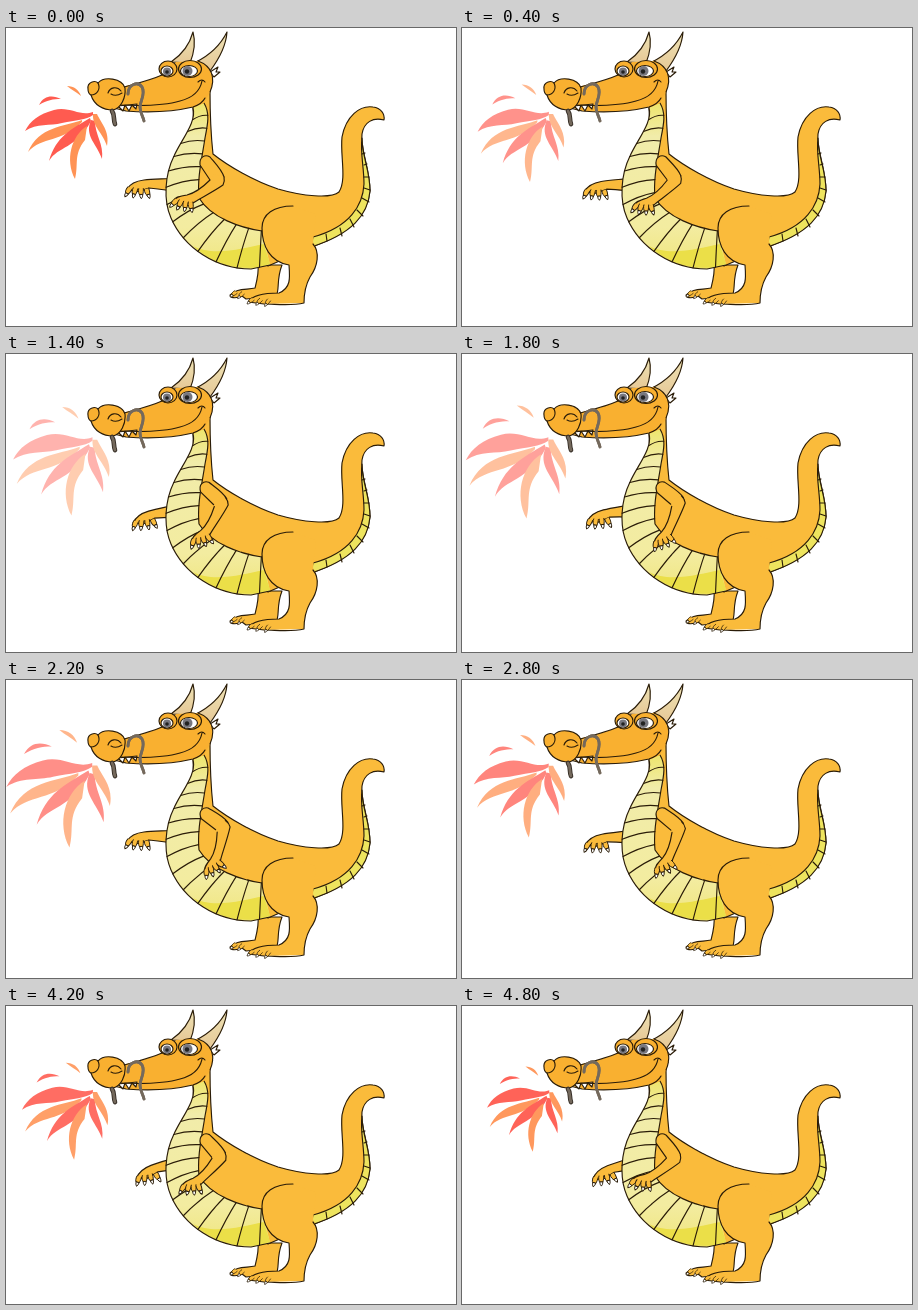
Recreate the animation shown at these times as an HTML page. Size 450 px wide and 298 px high, loop 5 s.

```html
<!DOCTYPE html>
<html lang="en">
<head>
<meta charset="utf-8">
<title>Dragon breathing fire</title>
<style>
html, body { margin: 0; width: 100%; height: 100%; overflow: hidden; background: #fff; }
svg { display: block; width: 450px; height: 298px; }
.ink { stroke: #2a1c08; stroke-width: 1.15; stroke-linejoin: round; stroke-linecap: round; }
.line { fill: none; }
.skin { fill: #fabb3b; }
.head { fill: #f9b030; }
.bare { stroke: none; }
.whisker { fill: none; stroke-linecap: round; stroke: #332b24; stroke-width: 4.6; }
.whisker + .whisker { stroke: #74695c; stroke-width: 2.8; }
.red { fill: #ff5b50; }
.orange { fill: #ff9355; }
</style>
</head>
<body>
<svg viewBox="0 0 450 298">
  <defs>
    <linearGradient id="belly" x1="0" y1="0" x2="0" y2="1">
      <stop offset="0" stop-color="#eee56c"/>
      <stop offset=".2" stop-color="#f1ecaa"/>
      <stop offset=".75" stop-color="#f3eca0"/>
      <stop offset="1" stop-color="#efe57c"/>
    </linearGradient>
    <linearGradient id="horn" x1="0" y1="0" x2="0" y2="1">
      <stop offset="0" stop-color="#ede2b5"/>
      <stop offset="1" stop-color="#e6c896"/>
    </linearGradient>
    <g id="toe">
      <path class="skin" d="M-3 0C-4 3 -3 7 -2 8L2 8C3 5 3 2 3 0"/>
      <path fill="#fff" d="M-2 8Q-2 11 0 13Q2 11 2 8Z"/>
    </g>
  </defs>

  <g id="fire">
    <path class="orange" d="M61 58C68 58 73 62 75 68C70 64 66 62 61 58Z"/>
    <path class="red" d="M33 77C38 67 47 67 55 71C47 71 41 72 33 77Z"/>
    <path class="red" d="M87 84C74 89 64 78 48 82C33 86 24 93 19 103C31 95 44 98 56 95C70 92 80 92 87 87Z"/>
    <path class="orange" d="M76 92C58 99 33 98 22 124C36 108 56 115 76 94Z"/>
    <path class="red" d="M84 90C66 101 50 108 43 133C52 118 70 121 85 93Z"/>
    <path class="orange" d="M81 98C65 108 59 132 69 151C73 136 67 127 79 112Z"/>
    <path class="red" d="M85 92C78 108 91 116 96 131C98 116 89 107 89 93Z"/>
    <path class="orange" d="M87 86C86 98 97 105 101 118C104 103 95 95 91 86Z"/>
  </g>

  <!-- far arm and leg -->
  <g id="farArm" class="ink">
    <path class="skin" d="M172 150C157 151 147 151 138 152C130 153 124 156 121 161L130 164L143 160C155 161 166 163 172 165Z"/>
    <g id="farHand"></g>
  </g>
  <path class="ink skin" d="M252 237C253 245 251 252 249 260C241 262 230 260 224 267C225 271 232 270 236 268L240 271L270 268C274 262 270 252 276 237Z"/>
  <g id="farFoot" class="ink"></g>

  <!-- trunk and tail -->
  <path class="ink skin" d="M187 78L204 62C204 85 205 108 207 126C222 138 248 153 272 161C296 168 325 171 333 164C341 151 334 128 336 109C340 88 354 77 367 79C375 80 379 86 378 92C367 89 358 94 356 106C354 121 364 140 364 163C362 186 345 205 306 219L262 238L190 180Z"/>
  <path class="ink" fill="#eee45e" d="M356 110C354 124 358 139 358 156C357 177 344 199 307 209L305 219C346 206 362 187 364 163C364 142 356 129 356 110Z"/>
  <path class="ink line" d="M356 126L359 125M358 137L361 136M358 149L363 149M358 160L364 162M356 170L363 174M351 182L357 188M344 191L348 199M334 200L336 208M320 206L321 213"/>
  <path class="bare" fill="url(#belly)" d="M187 80C191 94 175 112 168 128C159 146 157 172 165 190C178 220 210 241 245 241L264 237L256 203C235 200 205 190 193 170C191 150 196 130 199 110C202 95 204 85 198 75Z"/>
  <path class="bare" fill="#ebdf48" d="M187 218C207 229 238 220 258 216L264 236C240 245 208 238 187 218Z"/>
  <path id="front" class="ink line" d="M187 80C191 94 175 112 168 128C159 146 157 172 165 190C178 220 210 241 245 241L264 237"/>
  <path id="inner" class="ink line" d="M198 75C204 85 202 95 199 110C196 130 191 150 193 170C205 190 235 200 256 203"/>
  <path id="stripes" class="ink line"/>

  <!-- near leg -->
  <path class="skin" d="M256 200C256 186 268 178 287 178L310 186L307 214C314 224 312 238 304 249C299 258 298 267 298 275L258 276L242 274C247 266 263 265 273 265C285 260 284 250 283 237C264 234 256 218 256 200Z"/>
  <path class="ink line" d="M287 178C268 178 256 186 256 200C256 218 264 234 283 237C284 250 285 260 273 265C263 265 247 266 242 274L258 276C270 276 285 278 298 275C298 267 299 258 304 249C312 238 314 224 307 216"/>
  <g id="nearFoot" class="ink"></g>

  <!-- horns, ear, head -->
  <g class="ink" fill="url(#horn)">
    <path d="M165 34C177 26 184 15 187 4C190 15 188 25 184 35Z"/>
    <path d="M190 34C204 27 215 16 221 4C220 19 213 31 204 43Z"/>
  </g>
  <path class="ink" fill="#fff" d="M204 44L212 39L210 44L214 44L208 49Z"/>
  <path class="head" d="M116 59C132 55 145 52 156 47L170 34L192 33C206 38 210 50 204 64L198 75L187 79C170 83 145 85 120 83L108 79Z"/>
  <path class="ink line" d="M118 59C132 55 145 52 156 47M192 33C206 38 210 50 204 64M108 80L120 83C145 85 170 83 187 79Q196 76 199 70"/>
  <path class="ink" fill="#fff" d="M112 78L117 83L119 77L123 83L126 77L130 81L131 76Z"/>
  <path class="ink line" d="M112 77C135 78 161 77 174 73C186 70 194 63 196 53M192 54Q196 50 199 54"/>
  <path class="ink head" d="M82 61C81 54 89 52 92 55C98 48 116 50 119 60C120 70 115 80 107 82C97 82 88 77 85 67C83 66 82 64 82 61Z"/>
  <path class="ink line" d="M92 55C95 61 91 67 85 67M102 65C104 59 111 58 115 63M105 66Q110 69 116 65"/>

  <g class="ink">
    <ellipse class="head" cx="162" cy="41" rx="9" ry="8"/>
    <ellipse class="head" cx="184" cy="41" rx="11.500" ry="8.500"/>
    <ellipse cx="161" cy="43" rx="6" ry="5" fill="#fff"/>
    <ellipse cx="183" cy="43" rx="8.500" ry="5.500" fill="#fff"/>
  </g>
  <g fill="#77777f">
    <circle cx="161" cy="43.500" r="4"/>
    <circle cx="181.500" cy="43" r="5"/>
  </g>
  <circle cx="161" cy="44" r="1.800" fill="#222"/>
  <circle cx="181" cy="43.500" r="2.200" fill="#222"/>

  <path class="whisker" d="M106 83C109 87 107 91 109 96"/>
  <path class="whisker" d="M106 83C109 87 107 91 109 96"/>
  <path class="whisker" d="M122 66C122 56 132 53 136 59C140 66 134 73 134 79C134 85 137 88 138 93"/>
  <path class="whisker" d="M122 66C122 56 132 53 136 59C140 66 134 73 134 79C134 85 137 88 138 93"/>

  <!-- near arm: forearm hangs from the elbow -->
  <g id="upperArm" class="ink">
    <path class="bare skin" d="M194 137C193 129 199 126 204 129L218 148L217 157L204 153Z"/>
    <path class="line" d="M204 152L194 137C193 129 199 126 204 129C209 135 216 142 218 149"/>
    <g id="forearm">
      <path class="bare skin" d="M204 152C197 159 189 165 181 167C174 168 169 169 168 173L180 176L187 175C191 172 207 164 217 157L218 149L208 146Z"/>
      <path class="line" d="M204 152C197 159 189 165 181 167C174 168 169 169 168 173L180 176L187 175C191 172 207 164 217 157Q219 153 218 149"/>
      <g id="nearHand"></g>
    </g>
  </g>
</svg>
<script>
const LOOP = 5000, STEP = 200;
const $ = id => document.getElementById(id);
const move = (id, value) => $(id).setAttribute("transform", value);

// Fan of toes from (x, y), each one further along and turned a little more
function toes(id, count, x, y, dx, dy, turn, dTurn, size) {
  for (let i = 0; i < count; i++) {
    $(id).innerHTML += `<use href="#toe" transform="translate(${x + dx * i} ${y + dy * i})
      rotate(${turn + dTurn * i}) scale(${size})"/>`;
  }
}
toes("farHand", 4, 124, 160, 5.5, 0.3, 30, -16, .78);
toes("nearHand", 4, 171, 172, 4.5, 0.8, 45, -18, .8);
toes("nearFoot", 3, 247, 271, 8, 0.5, 50, -8, .6);
toes("farFoot", 2, 230, 264, 7, 1, 50, -6, .6);

// Belly bands join the front edge to the inner one, spreading further apart lower down
let bands = "";
for (let i = 1; i <= 13; i++) {
  const a = $("front").getPointAtLength(11.5 * i + .45 * i * i);
  const b = $("inner").getPointAtLength(13 * i);
  bands += `M${a.x} ${a.y}Q${(a.x + b.x) / 2} ${(a.y + b.y) / 2 - 3} ${b.x} ${b.y}`;
}
$("stripes").setAttribute("d", bands);

// Key points: [time, value]
const reach = [[0, 71], [2300, 90.5], [3300, 66], [3900, 78.5], [LOOP, 62]];
const glow = [[0, 1], [400, .66], [1400, .46], [2200, .68], [LOOP, .97]];
const droop = [[0, 0], [1600, 11], [2200, 0], [4200, 14], [LOOP, 15]];

function along(keys, t) {
  const i = keys.findIndex(k => k[0] > t);
  const [t0, a] = keys[i - 1], [t1, b] = keys[i];
  return a + (b - a) * (t - t0) / (t1 - t0);
}

function draw(now) {
  const t = Math.floor(now % LOOP / STEP) * STEP;
  const size = along(reach, t) / 71;
  const far = along(droop, t);
  const swing = t < 2300 ? t / 2300 : (LOOP - t) / (LOOP - 2300);
  move("fire", `translate(90 88) scale(${size}) translate(-90 -88)`);
  $("fire").setAttribute("opacity", along(glow, t));
  move("farArm", `translate(${far / 2} 0) rotate(${-far} 168 156)`);
  move("upperArm", `rotate(${-20 * swing} 200 134)`);
  move("forearm", `rotate(${-25 * swing} 211 152)`);
}

const start = performance.now();
function tick() {
  draw(performance.now() - start);
  requestAnimationFrame(tick);
}
tick();
</script>
</body>
</html>
```
